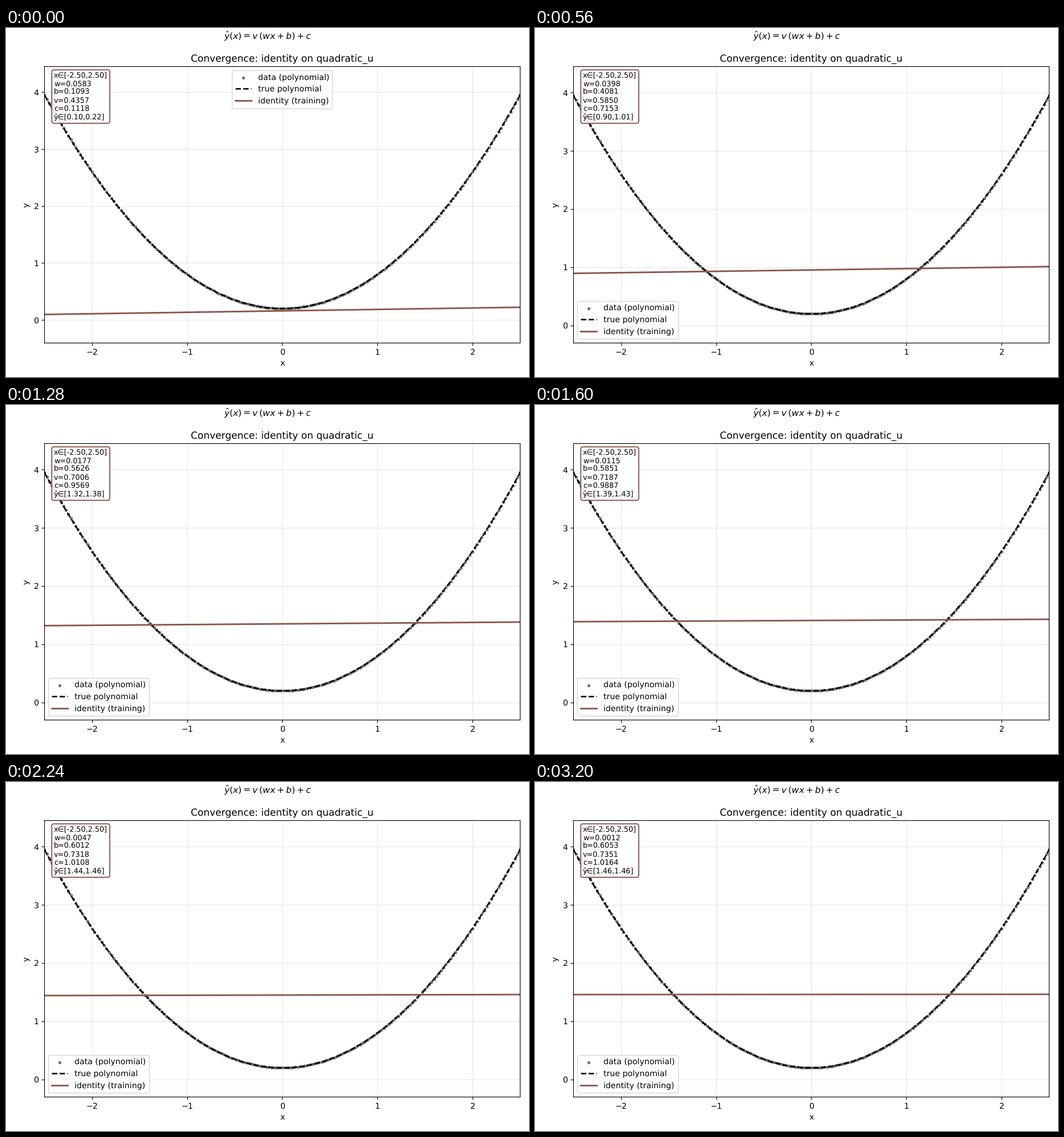
Animation of 917 by 611 pixels, one loop 3.28 s. Source, as a matplotlib script:

```python
import numpy as np
import matplotlib.pyplot as plt
from matplotlib.animation import FuncAnimation

plt.rcParams["text.hinting"] = "none"

W, H, DPI = 917, 611, 101.87
FRAMES, INTERVAL = 41, 80
STEPS, RATE = 25, 0.002
BROWN = "#8c564b"

x = np.linspace(-2.5, 2.5, 200)
y = 0.6 * x**2 + 0.2


def train():
    """Gradient descent on the mean squared error, one snapshot per frame."""
    w, b, v, c = 0.0583, 0.10932, 0.4357, 0.11178
    history = []
    for _ in range(FRAMES):
        history.append((w, b, v, c))
        for _ in range(STEPS):
            hidden = w * x + b
            err = 2 * (v * hidden + c - y)
            grads = (np.mean(err * v * x), np.mean(err * v),
                     np.mean(err * hidden), np.mean(err))
            w, b, v, c = (p - RATE * g for p, g in zip((w, b, v, c), grads))
    return history


history = train()

fig = plt.figure(figsize=(W / DPI, H / DPI), dpi=DPI)
left, right, top, bottom = 67.4, 901.4, 67.4, 551.4
ax = fig.add_axes([left / W, 1 - bottom / H, (right - left) / W, (bottom - top) / H])

ax.scatter(x, y, s=8, color="black", alpha=0.45, label="data (polynomial)")
ax.plot(x, y, "k--", lw=1.8, label="true polynomial")
fit, = ax.plot([], [], color=BROWN, lw=2, label="identity (training)")
info = ax.text(0.02, 0.98, "", transform=ax.transAxes, ha="left", va="top",
               fontsize=9,
               bbox=dict(boxstyle="round,pad=0.3", fc="white", ec=BROWN,
                         lw=1.5, alpha=0.9))

fig.suptitle(r"$\hat{y}(x) = v\,(wx+b)+c$", fontsize=11, y=0.995)
ax.set_title("Convergence: identity on quadratic_u")
ax.set(xlabel="x", ylabel="y", xlim=(-2.5, 2.5))
ax.grid(alpha=0.3)
ax.legend(loc="best")


def update(i):
    w, b, v, c = history[i]
    pred = v * (w * x + b) + c
    fit.set_data(x, pred)
    ax.set_ylim(min(y.min(), pred.min()) - 0.5, max(y.max(), pred.max()) + 0.5)
    info.set_text(f"x∈[{x[0]:.2f},{x[-1]:.2f}]\n"
                  f"w={w:.4f}\nb={b:.4f}\nv={v:.4f}\nc={c:.4f}\n"
                  f"ŷ∈[{pred.min():.2f},{pred.max():.2f}]")
    return fit, info


anim = FuncAnimation(fig, update, frames=FRAMES, interval=INTERVAL,
                     repeat=True, repeat_delay=0, blit=False)
plt.show()
```
